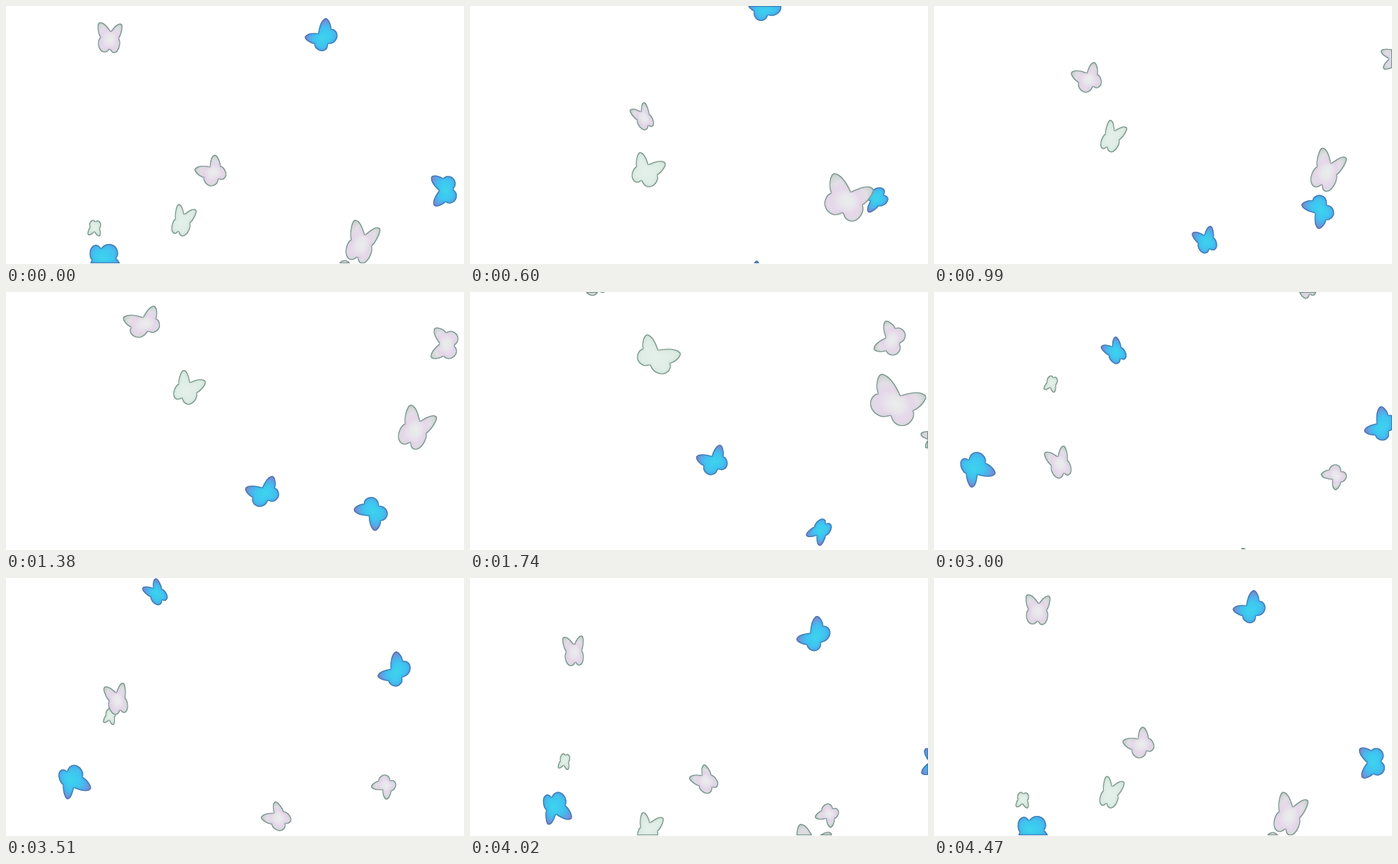
Animation, 640 px wide and 360 px high, one loop 4.5 s. Source, as an HTML page:

```html
<!DOCTYPE html>
<html lang="en">
<head>
<meta charset="utf-8">
<title>Butterflies</title>
<style>
html, body { margin: 0; width: 100%; height: 100%; overflow: hidden; background: #fff; }
svg { display: block; width: 100vw; height: 100vh; }
</style>
</head>
<body>
<svg id="stage" viewBox="0 0 640 360" xmlns="http://www.w3.org/2000/svg">
  <defs>
    <clipPath id="frame"><rect width="640" height="359"/></clipPath>
    <path id="wing" vector-effect="non-scaling-stroke" d="M-.05 .28C.2 .6 .65 1.1 .95 1.02C1.1 .94 .98 .3 .74 .03C.98 -.15 .92 -.6 .72 -.82C.55 -1 .3 -1.02 .16 -.88C.08 -.8 .03 -.74 -.05 -.7Z"/>
  </defs>
</svg>
<script>
const LOOP = 4500;
const SPAN = 4470; // the flight closes here, then rests until the loop ends
const BEATS = 9;
const NS = 'http://www.w3.org/2000/svg';
const stage = document.getElementById('stage');
const defs = stage.querySelector('defs');
const flies = [];

function add(parent, tag, attrs) {
  const el = document.createElementNS(NS, tag);
  for (const k in attrs) el.setAttribute(k, attrs[k]);
  return parent.appendChild(el);
}

// A flock shares one wing gradient, a soft inner shade and a thin dark edge.
function flock(id, colors, shade, edge) {
  const fill = `url(#${id}Fill)`;
  const grad = add(defs, 'radialGradient', { id: id + 'Fill', gradientUnits: 'userSpaceOnUse', cx: 0, cy: -.1, r: 1.4 });
  colors.forEach((color, i) => add(grad, 'stop', { offset: i / (colors.length - 1), 'stop-color': color }));

  const f = add(defs, 'filter', {
    id: id + 'Rim', filterUnits: 'userSpaceOnUse', x: -10, y: -10, width: 660, height: 380,
    'color-interpolation-filters': 'sRGB'
  });
  const rim = (name, color, opacity, tag, attrs) => {
    add(f, tag, { in: 'SourceAlpha', ...attrs, result: name + 'Core' });
    add(f, 'feFlood', { 'flood-color': color, 'flood-opacity': opacity });
    add(f, 'feComposite', { operator: 'out', in2: name + 'Core' });
    add(f, 'feComposite', { operator: 'in', in2: 'SourceAlpha', result: name });
  };
  rim('soft', shade, .9, 'feGaussianBlur', { stdDeviation: 2.4 });
  rim('line', edge, .7, 'feMorphology', { operator: 'erode', radius: 1 });
  const merge = add(f, 'feMerge', {});
  for (const name of ['SourceGraphic', 'soft', 'line']) add(merge, 'feMergeNode', { in: name });

  const clip = add(stage, 'g', { 'clip-path': 'url(#frame)' });
  return add(clip, 'g', { fill, stroke: fill, 'stroke-width': 2.4, 'stroke-linejoin': 'round', filter: `url(#${id}Rim)` });
}

// A curved flight between two points; bend is the offset from the straight line halfway.
function fly(group, start, end, from, to, bend, { size, phase, roll = 0, turn = 0 }) {
  const wings = [-1, 1].map(side => ({ side, el: add(group, 'use', { href: '#wing' }) }));
  const first = start - (SPAN - (end - start)) / 2;
  flies.push({ wings, start, end, first, from, to, bend, size, phase, roll, turn });
}

function place(f, time) {
  const t = f.first + ((time - f.first) % SPAN + SPAN) % SPAN;
  const u = (t - f.start) / (f.end - f.start);
  const [x, y] = [0, 1].map(c => f.from[c] + (f.to[c] - f.from[c]) * u + f.bend[c] * 4 * u * (1 - u));
  const [dx, dy] = [0, 1].map(c => f.to[c] - f.from[c] + f.bend[c] * 4 * (1 - 2 * u));

  const heading = Math.atan2(dy, dx) + f.turn;
  const ax = f.size * Math.cos(heading), ay = f.size * Math.sin(heading);
  const open = 1 + .35 * Math.sin(2 * Math.PI * (BEATS * t / SPAN + f.phase));
  for (const { side, el } of f.wings) {
    const reach = side * open * (1 + side * f.roll), sweep = -.08;
    const sx = -ay * reach + ax * sweep, sy = ax * reach + ay * sweep;
    el.setAttribute('transform', `matrix(${sx} ${sy} ${ax} ${ay} ${x} ${y})`);
  }
}

const blue = flock('blue', ['#42d2ea', '#3ccdf0', '#40c4f0', '#52aeea', '#8a88d0'], '#3f8fd8', '#40689c');
const mint = flock('mint', ['#e4f0ea', '#dcece4'], '#b0c8bb', '#55776a');
const pink = flock('pink', ['#e9eeec', '#e8e6eb', '#e6d6ea', '#e2dfe5', '#d0d4d3'], '#afc2ba', '#56796f');

fly(blue, 3510, 5070, [543, 131], [411, 1], [-22, -8], { size: 16, phase: .1, roll: .12 });
fly(blue, 0, 1740, [612, 257], [489, 334], [-4, -16], { size: 16, phase: .37 });
fly(blue, 2490, 4470, [13, 211], [134, 354], [16, 0], { size: 20, phase: .48, roll: -.18, turn: .3 });
fly(blue, 600, 3510, [397, 374], [210, 20], [18, 0], { size: 16, phase: .57, roll: -.06 });

fly(mint, 2490, 4470, [187, 61], [124, 310], [-9, 4], { size: 10, phase: .6 });
fly(mint, 0, 1740, [246, 299], [259, 88], [-5, 3], { size: 20, phase: .78, roll: .1, turn: .35 });

fly(pink, 2490, 4470, [206, 309], [146, 44], [-19, -4], { size: 20, phase: .6, roll: -.1 });
fly(pink, 3510, 5850, [380, 333], [194, 42], [-15, 17], { size: 17, phase: .49, roll: -.12 });
fly(pink, 0, 1740, [498, 330], [597, 154], [-4, 0], { size: 27, phase: .84, roll: -.08, turn: -.12 });
fly(pink, 1380, 2490, [613, 73], [543, 31], [-3, 8], { size: 17, phase: .62 });
fly(pink, 1740, 3510, [646, 204], [530, 291], [-3, -10], { size: 13, phase: .41, roll: .08 });

let begin;
function tick(now) {
  begin ??= now;
  const time = Math.min((now - begin) % LOOP, SPAN);
  for (const f of flies) place(f, time);
  requestAnimationFrame(tick);
}
requestAnimationFrame(tick);
</script>
</body>
</html>
```
